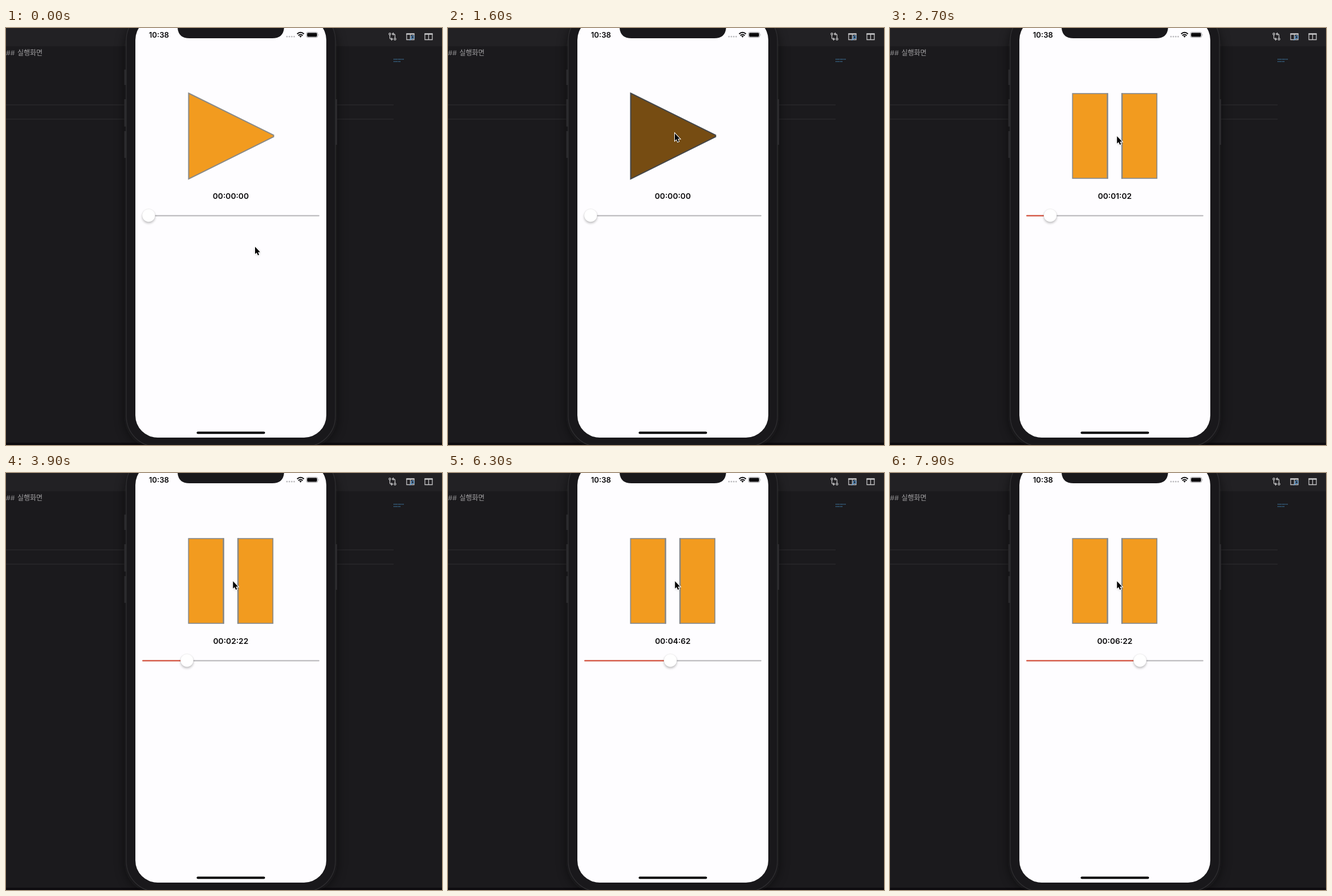
Recreate the animation shown at these times as an HTML page. Size 765x732 px, loop 8 s.

```html
<!DOCTYPE html>
<html lang="ko">
<head>
<meta charset="utf-8">
<title>Play button</title>
<style>
html, body { margin: 0; width: 100%; height: 100%; overflow: hidden; background: #1b1a1d; }
svg { display: block; width: 765px; height: 732px; }
.ui { font-family: Inter, "Liberation Sans", sans-serif; font-weight: 600; fill: #0b0a0c; }
.icon { fill: none; stroke: #c4c4c5; stroke-width: 1.3; }
.shape { fill: #f29b1f; stroke: #8a8a88; stroke-width: 2; }
.pressed .shape { fill: #764c12; stroke: #43464a; }
</style>
</head>
<body>
<svg viewBox="0 0 765 732">
  <defs>
    <filter id="glow" x="-20%" y="-10%" width="140%" height="120%"><feGaussianBlur stdDeviation="9"/></filter>
    <filter id="soft" x="-50%" y="-50%" width="200%" height="200%"><feGaussianBlur stdDeviation="2.2"/></filter>
  </defs>

  <!-- editor -->
  <rect width="765" height="732" fill="#1b1a1d"/>
  <rect width="765" height="32" fill="#222124"/>
  <path d="M0 135H680M0 160H680" stroke="#29282b" stroke-width="1.3"/>
  <rect y="728" width="765" height="4" fill="#0e0c10"/>
  <g fill="#a2a1a3">
    <text x="0" y="47.5" font-family="Liberation Mono, monospace" font-size="13">##</text>
    <text x="20" y="47.5" font-family="Noto Sans CJK KR, Noto Sans CJK, sans-serif" font-size="12">실행화면</text>
  </g>
  <path d="M680 54.8H698M680 58.8H692" stroke="#3f77a0" stroke-width="1.3" stroke-dasharray="2 .8 3 1"/>
  <g class="icon">
    <circle cx="673.5" cy="10.5" r="1.6"/>
    <path d="M673.5 12V17Q673.5 19.5 676 19.5H678M676 17.3L678.2 19.5 676 21.7"/>
    <circle cx="682.5" cy="19.5" r="1.6"/>
    <path d="M682.5 18V13Q682.5 10.5 680 10.5H678M680 8.3L677.8 10.5 680 12.7"/>
    <path d="M703 10.5H716V20.5H703ZM709.5 10V20M735 10.5H748V20.5H735ZM741.5 10V20"/>
    <path d="M702.4 10.5H716.6M734.4 10.5H748.6" stroke-width="2.4"/>
    <circle cx="713.5" cy="16" r="2.4" fill="#222124" stroke="#5b9bd5"/>
    <path d="M712 18L708.5 21.5" stroke="#5b9bd5"/>
  </g>

  <!-- phone -->
  <rect x="208" y="-20" width="373" height="758" rx="54" fill="#0c0b0e" opacity=".5" filter="url(#glow)"/>
  <path d="M207.5 73h4v27h-4zM207.5 125h4v48h-4zM207.5 181h4v47h-4zM577 125h4v80h-4z" fill="#2b2a2d"/>
  <rect x="211" y="-32" width="367" height="767" rx="54" fill="#19181b" stroke="#2f2e31" stroke-width="1.3"/>
  <rect x="227" y="-18" width="335" height="737" rx="39" fill="#fefdff"/>
  <path d="M301 -2Q301.5 18 322 18H467Q487.500 18 488 -2Z" fill="#19181b"/>
  <rect x="334.500" y="708.500" width="120" height="4" rx="2"/>

  <!-- status bar -->
  <text class="ui" x="268.400" y="16.600" font-size="13.200" text-anchor="middle">10:38</text>
  <path d="M493 15.200H506" stroke="#bbbabd" stroke-width="2.800" stroke-linecap="round" stroke-dasharray="0 4.200"/>
  <g fill="none" stroke="#0b0a0c" stroke-width="2">
    <path d="M510.800 10.600Q516.800 5 522.800 10.600M513 13.200Q516.800 9.700 520.600 13.200"/>
    <path d="M514.700 14.400Q516.800 12.700 518.900 14.400L516.800 16.800Z" fill="#0b0a0c" stroke="none"/>
  </g>
  <rect x="527" y="7.300" width="20" height="9.400" rx="2.800" fill="none" stroke="#a5a4a7" stroke-width=".9"/>
  <rect x="528.300" y="8.600" width="17.400" height="6.800" rx="1.600" fill="#0b0a0c"/>
  <path d="M548 10.500Q549.500 12 548 13.500Z" fill="#a5a4a7"/>

  <!-- player -->
  <g id="play">
    <path class="shape" d="M320.500 114.500L469.500 188V191L320.500 265Z"/>
  </g>
  <g id="pause">
    <path class="shape" d="M320.300 115.200H381.800V263.800H320.300ZM406.800 115.200H468.300V263.800H406.800Z" style="stroke-width:1.700"/>
    <path d="M381.500 114.500V264.500M407.100 114.500V264.500" stroke="#8a8a88" stroke-width="2.500"/>
  </g>
  <text id="clock" class="ui" x="394.400" y="300.300" font-size="13.750" text-anchor="middle">00:00:00</text>
  <path d="M240 329.500H549" stroke="#b5b4b7" stroke-width="1.800" stroke-linecap="round"/>
  <path id="done" stroke="#dc4a32" stroke-width="1.800" stroke-linecap="round"/>
  <g id="knob">
    <circle cy="331.500" r="11" opacity=".28" filter="url(#soft)"/>
    <circle cy="329" r="11.400" fill="#fff" stroke="#000" stroke-opacity=".1" stroke-width=".6"/>
  </g>
  <g id="cursor">
    <path d="M0 1V14L3 11 5 16 7 15 5 10.300H9Z" opacity=".3" filter="url(#soft)"/>
    <path d="M0 0V12.800L2.900 10.200 5 15 7.100 14.100 5 9.400H9Z" stroke="#fff" stroke-width="2" paint-order="stroke"/>
  </g>
</svg>
<script>
const LOOP = 8000, STEP = 100, START = 1680, PRESS = 1600, RELEASE = 1700;
// time, x, y of the pointer tip
const path = [
  [0, 437, 384], [300, 437, 384], [400, 431, 350], [500, 410, 265], [600, 396, 205],
  [700, 393.5, 194], [800, 393.5, 194], [1100, 398, 185], [1600, 398, 185],
  [1800, 398.3, 190], [LOOP, 398.3, 190]
];
const el = id => document.getElementById(id);
const two = n => String(n).padStart(2, "0");

function pointer(t) {
  const i = path.findIndex(p => p[0] > t);
  const [a, b] = [path[i - 1], path[i]];
  const k = (t - a[0]) / (b[0] - a[0]);
  return [1, 2].map(j => a[j] + (b[j] - a[j]) * k);
}

function draw(t) {
  const ms = Math.max(0, t - START);
  const playing = t >= RELEASE;
  el("play").style.display = playing ? "none" : "";
  el("pause").style.display = playing ? "" : "none";
  el("play").classList.toggle("pressed", t >= PRESS && !playing);
  el("clock").textContent =
    [Math.floor(ms / 60000), Math.floor(ms / 1000) % 60, Math.floor(ms / 10) % 100].map(two).join(":");
  const x = 250.3 + ms * 0.03027;
  el("knob").setAttribute("transform", `translate(${x})`);
  el("done").setAttribute("d", `M240 329.5H${x}`);
  el("cursor").setAttribute("transform", `translate(${pointer(t)})`);
}

function tick() {
  const t = performance.now() % LOOP;
  draw(Math.floor(t / STEP) * STEP);
  requestAnimationFrame(tick);
}
tick();
</script>
</body>
</html>
```
